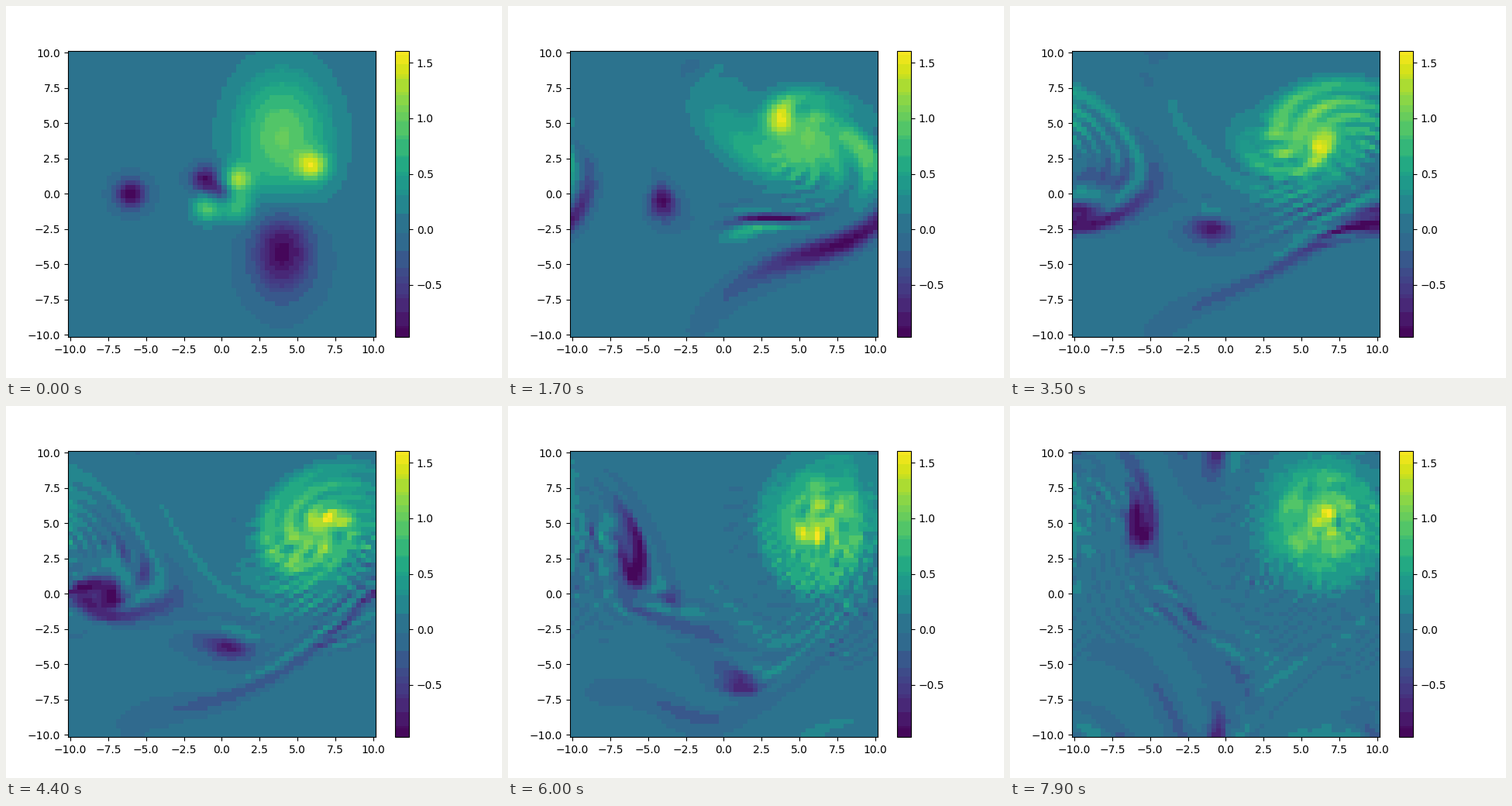
Animation, 640 px wide and 480 px high, one loop 8 s. Source, as a matplotlib script:

```python
import numpy as np
import matplotlib.pyplot as plt
from matplotlib.animation import FuncAnimation
from matplotlib.colors import ListedColormap

# Vorticity-streamfunction flow on a doubly periodic box
N, L = 64, 20.0
FRAMES, DT, SUBSTEPS = 80, 0.1, 5
NU = 0.001
VMIN, VMAX = -0.973, 1.611

x = np.linspace(-L / 2, L / 2, N)
h = x[1] - x[0]
X, Y = np.meshgrid(x, x)

k = 2 * np.pi / L * np.fft.fftfreq(N, 1 / N)
K2 = k[None, :] ** 2 + k[:, None] ** 2
K2[0, 0] = 1.0


def blob(amp, cx, cy, a=1.0, b=1.0):
    return amp * np.exp(-(X - cx) ** 2 / a - (Y - cy) ** 2 / b)


def ddx(f):
    return (np.roll(f, -1, 1) - np.roll(f, 1, 1)) / (2 * h)


def ddy(f):
    return (np.roll(f, -1, 0) - np.roll(f, 1, 0)) / (2 * h)


def laplacian(f):
    ring = sum(np.roll(f, s, ax) for s in (-1, 1) for ax in (0, 1))
    return (ring - 4 * f) / h ** 2


def stream(w):
    ph = -np.fft.fft2(w) / K2
    ph[0, 0] = 0
    return np.fft.ifft2(ph).real


def rhs(w):
    # Arakawa average of the three Jacobian forms
    p = stream(w)
    px, py, wx, wy = ddx(p), ddy(p), ddx(w), ddy(w)
    jac = (px * wy - py * wx
           + ddx(p * wy) - ddy(p * wx)
           + ddy(w * px) - ddx(w * py)) / 3
    return NU * laplacian(w) - jac


def step(w):
    k1 = rhs(w)
    k2 = rhs(w + DT / 2 * k1)
    k3 = rhs(w + DT / 2 * k2)
    k4 = rhs(w + DT * k3)
    return w + DT / 6 * (k1 + 2 * k2 + 2 * k3 + k4)


def simulate():
    w = (blob(1, 4, 4, 10.5, 22) + blob(-1, 4, -4, 4, 9)
         + blob(1, 6, 2) + blob(-1, -6, 0)
         + blob(-1, -1, 1) + blob(1, 1, 1)
         + blob(0.9, -1, -1) + blob(0.65, 1, -1)
         + blob(-0.7, 0, 0.1, 0.5, 0.5))
    fields = [w]
    for _ in range(FRAMES - 1):
        for _ in range(SUBSTEPS):
            w = step(w)
        fields.append(w)
    return fields


def banded_viridis(w):
    """Viridis merged into coarse RGB cells, each weighted by its use."""
    rgb = np.round(plt.get_cmap("viridis")(np.arange(256))[:, :3] * 255).astype(int)
    cells = (rgb >> np.array([5, 4, 5])) @ np.array([256, 16, 1])
    idx = np.clip((w - VMIN) / (VMAX - VMIN) * 256, 0, 255).astype(int)
    weight = 26 + 36 * np.bincount(idx.ravel(), minlength=256)
    out = np.empty((256, 3))
    for c in np.unique(cells):
        m = cells == c
        out[m] = np.average(rgb[m], axis=0, weights=weight[m])
    return ListedColormap(out / 255)


fields = simulate()

fig, ax = plt.subplots(figsize=(6.4, 4.8), dpi=100)
mesh = ax.pcolormesh(x, x, fields[0], shading="nearest",
                     cmap=banded_viridis(fields[0]), vmin=VMIN, vmax=VMAX)
fig.colorbar(mesh)


def update(i):
    mesh.set_array(fields[i])
    return [mesh]


anim = FuncAnimation(fig, update, frames=FRAMES, interval=100,
                     repeat=True, repeat_delay=0)
plt.show()
```
